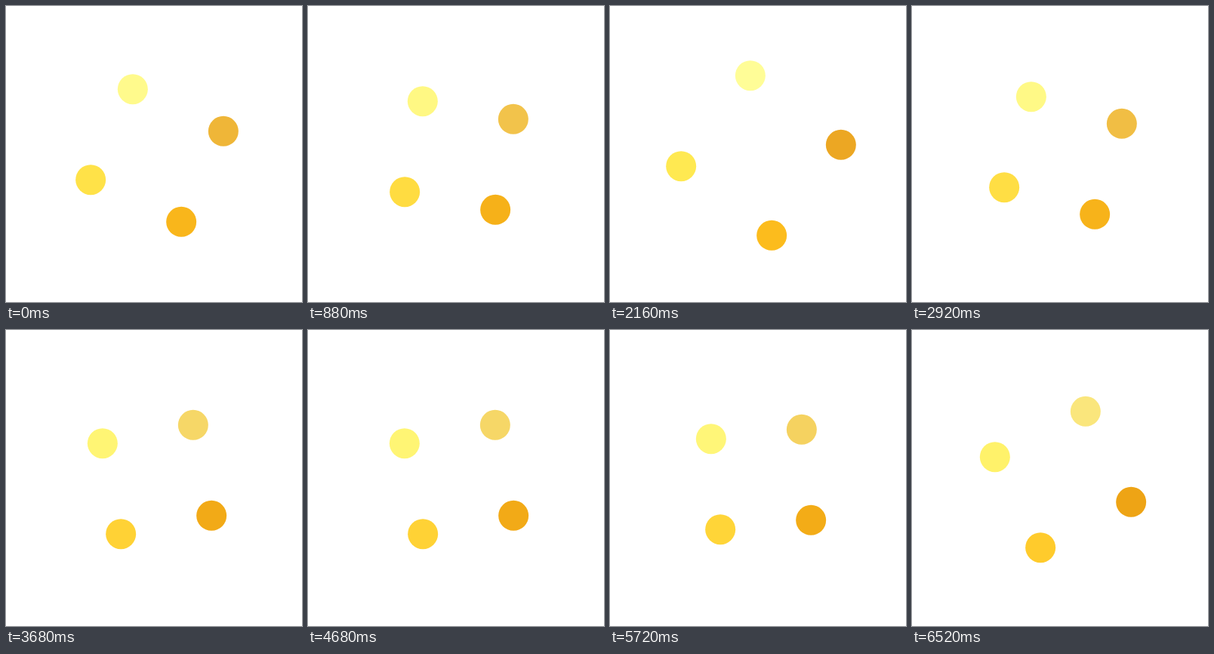
An HTML page with a canvas for the animation above (6560 ms loop, 392 by 392 pixels).

```html
<!DOCTYPE html>
<html lang="en">
<head>
<meta charset="utf-8">
<title>Orbiting dots</title>
<style>
  html, body { margin: 0; width: 100%; height: 100%; overflow: hidden; background: #fff; }
  canvas { display: block; }
</style>
</head>
<body>
<canvas width="392" height="392"></canvas>
<script>
const ctx = document.querySelector('canvas').getContext('2d');
const LOOP = 6560, STEP = 40, TICKS = 60, START = 0.732, RADIUS = 20;

// Diamond corners, clockwise from the left, each with the colour a dot has there
const corners = [
  { pos: [80, 198], rgb: [255, 238, 88] },
  { pos: [200, 78], rgb: [255, 255, 159] },
  { pos: [320, 198], rgb: [233, 155, 18] },
  { pos: [200, 318], rgb: [255, 192, 30] }
];

const mix = (a, b, k) => a.map((v, i) => v + (b[i] - v) * k);

function draw(now) {
  // The motion advances in 1/60 s ticks, sampled every 40 ms
  const time = Math.floor(now % LOOP / STEP) * STEP;
  const seconds = Math.floor(time * TICKS / 1000) / TICKS;
  const k = (START + seconds) % 1;

  ctx.fillStyle = '#fff';
  ctx.fillRect(0, 0, 392, 392);
  corners.forEach((from, i) => {
    const to = corners[(i + 1) % 4];
    const [x, y] = mix(from.pos, to.pos, k);
    ctx.fillStyle = `rgb(${mix(from.rgb, to.rgb, k).map(Math.round)})`;
    ctx.beginPath();
    ctx.arc(x, y, RADIUS, 0, Math.PI * 2);
    ctx.fill();
  });
}

const start = performance.now();
function tick() {
  draw(performance.now() - start);
  requestAnimationFrame(tick);
}
tick();
</script>
</body>
</html>
```
